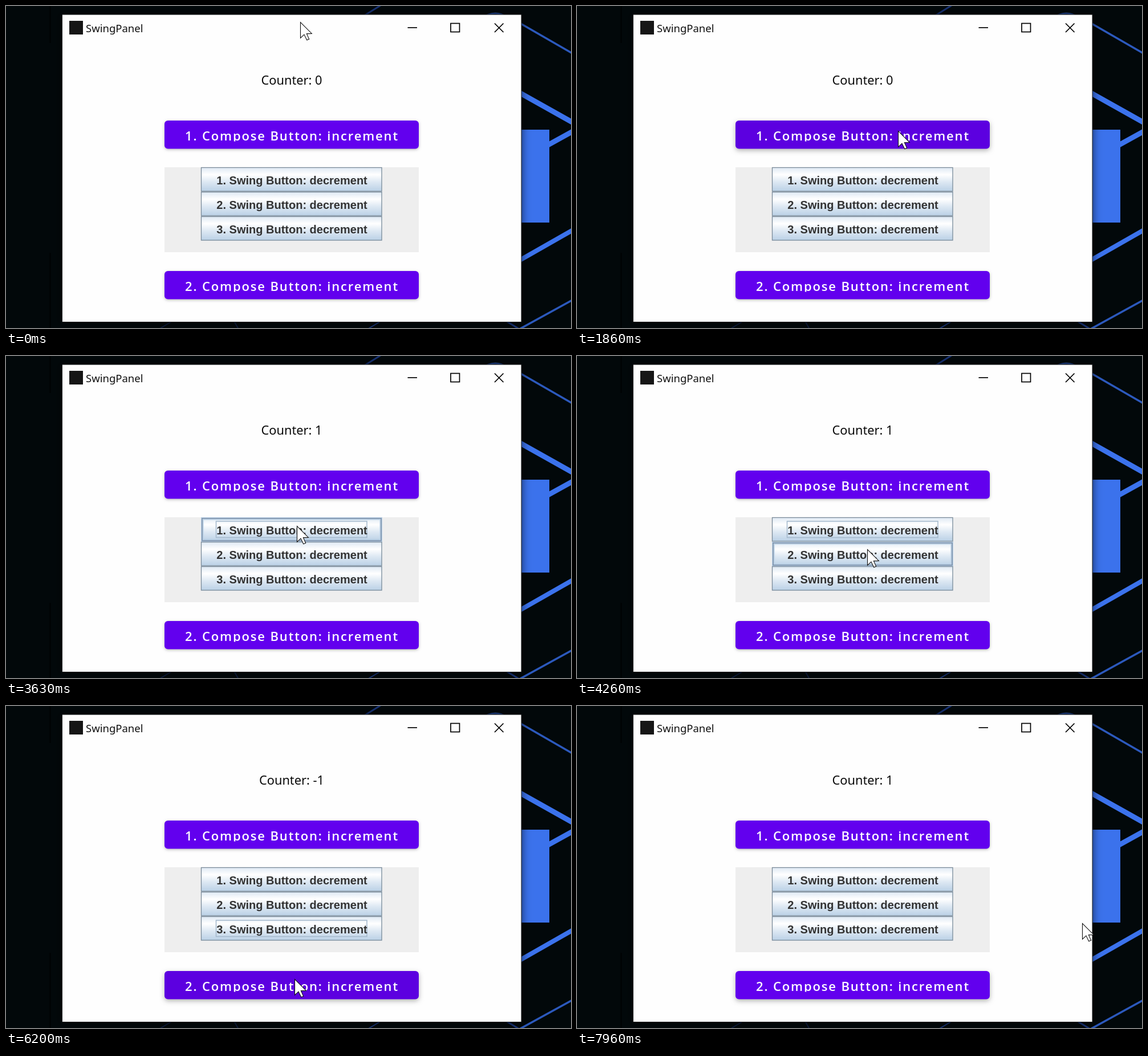
Write an HTML page with a canvas that moves like this. It is 991 by 565 pixels and loops after 8 s.

```html
<!DOCTYPE html>
<html lang="en">
<head>
<meta charset="utf-8">
<title>SwingPanel</title>
<style>
  html, body { margin: 0; width: 100%; height: 100%; overflow: hidden; background: #02080a; }
  canvas { display: block; }
</style>
</head>
<body>
<canvas id="stage" width="991" height="565"></canvas>
<script>
const ctx = document.getElementById('stage').getContext('2d');
const LOOP = 8000;
const PURPLE = '#6200ee';
const BLUE = '#3b72ec';

// Pointer moves: start and end time, target, optional control point.
const START = [516, 28];
const MOVES = [
  { t0: 1160, t1: 1860, to: [563, 219] },
  { t0: 2630, t1: 3300, to: [510, 298], via: [508, 253] },
  { t0: 3860, t1: 4240, to: [509, 339] },
  { t0: 4700, t1: 5000, to: [511, 375] },
  { t0: 5830, t1: 6200, to: [506, 479] },
  { t0: 7100, t1: 7960, to: [886, 381] }
];

const CLICKS = [
  { target: 'inc1', down: 2100, up: 2230, step: 1 },
  { target: 'inc1', down: 2400, up: 2530, step: 1 },
  { target: 0, down: 3500, up: 3630, step: -1 },
  { target: 1, down: 4360, up: 4530, step: -1 },
  { target: 2, down: 5300, up: 5430, step: -1 },
  { target: 'inc2', down: 6400, up: 6530, step: 1 },
  { target: 'inc2', down: 6730, up: 6860, step: 1 }
];

const COMPOSE = [
  { id: 'inc1', y: 201, label: '1. Compose Button: increment' },
  { id: 'inc2', y: 465, label: '2. Compose Button: increment' }
];
const BOX = { x: 278, w: 446, h: 49.5 };
const SWING = { x: 342, y: 283, w: 318, h: 43 };

const clamp = v => Math.max(0, Math.min(1, v));
const smooth = u => u * u * (3 - 2 * u);

function pointerAt(t) {
  let from = START;
  for (const { t0, t1, to, via } of MOVES) {
    if (t < t0) break;
    const e = smooth(clamp((t - t0) / (t1 - t0)));
    const mid = via || [(from[0] + to[0]) / 2, (from[1] + to[1]) / 2];
    const axis = i => (1 - e) ** 2 * from[i] + 2 * e * (1 - e) * mid[i] + e * e * to[i];
    if (t < t1) return [Math.round(axis(0)), Math.round(axis(1))];
    from = to;
  }
  return from;
}

const inside = ([px, py], x, y, w, h) => px >= x && px < x + w && py >= y && py < y + h;

function rect(x, y, w, h, fill) {
  ctx.fillStyle = fill;
  ctx.fillRect(x, y, w, h);
}

function frame(x, y, w, h, color, width) {
  ctx.strokeStyle = color;
  ctx.lineWidth = width;
  ctx.strokeRect(x, y, w, h);
}

function line(x1, y1, x2, y2, color, width) {
  ctx.strokeStyle = color;
  ctx.lineWidth = width;
  ctx.beginPath();
  ctx.moveTo(x1, y1);
  ctx.lineTo(x2, y2);
  ctx.stroke();
}

function text(str, x, y, font, color, align = 'left', spacing = 0) {
  ctx.font = font;
  ctx.fillStyle = color;
  ctx.textAlign = align;
  ctx.letterSpacing = spacing + 'px';
  ctx.fillText(str, x, y);
  ctx.letterSpacing = '0px';
}

function drawDesktop() {
  rect(0, 0, 991, 565, '#02080a');
  rect(76, 0, 3, 65, '#000304');
  rect(76, 433, 3, 132, '#000304');

  line(628, 17, 657, -1, '#173275', 3);
  line(896, 27, 995, 84, '#2c59bd', 3.5);
  line(896, 149.5, 995, 205, BLUE, 9);
  line(945, 247, 995, 219.5, BLUE, 9);
  line(896, 449, 995, 392.5, BLUE, 8);
  line(895, 570, 995, 515, '#2c59bd', 3.5);
  line(874, 551, 899, 566, '#173275', 3);
  line(268, 567, 290, 554, '#0c1a3a', 2);
  line(400, 553, 408, 567, '#0c1a3a', 2);
  line(634, 567, 656, 554, '#173275', 2);
  ctx.strokeStyle = '#23468f';
  ctx.lineWidth = 3;
  ctx.beginPath();
  ctx.arc(858, 48, 35, Math.PI * 1.2, Math.PI * 1.8);
  ctx.stroke();
  rect(790, 217, 163, 163, BLUE);
}

function drawWindow() {
  ctx.save();
  ctx.shadowColor = 'rgba(0,0,0,.6)';
  ctx.shadowBlur = 14;
  rect(98, 14.5, 806.5, 540.5, '#181c1e');
  ctx.restore();
  rect(99, 15.5, 804.5, 538.5, '#fefefe');
  rect(111, 26, 24, 24, '#161616');
  text('SwingPanel', 140, 46, '18.5px "Noto Sans", sans-serif', '#111');

  line(704.5, 38, 721, 38, '#000', 1.7);
  frame(780, 30.5, 15.5, 15, '#000', 1.7);
  line(857, 30.5, 872.5, 46, '#000', 1.7);
  line(872.5, 30.5, 857, 46, '#000', 1.7);
}

function drawRipple(click, t, y) {
  const age = t - click.down;
  const alpha = 0.12 * clamp(age / 75) * (1 - clamp((t - Math.max(click.up, click.down + 75)) / 150));
  if (age < 0 || alpha <= 0) return;
  const e = smooth(clamp(age / 225));
  const [px, py] = pointerAt(click.down);
  const cx = px + (BOX.x + BOX.w / 2 - px) * e;
  const cy = py + (y + BOX.h / 2 - py) * e;
  ctx.fillStyle = `rgba(0,0,0,${alpha})`;
  ctx.beginPath();
  ctx.arc(cx, cy, 134 + 108 * e, 0, Math.PI * 2);
  ctx.fill();
}

function drawCompose({ id, y, label }, t, pointer) {
  const { x, w, h } = BOX;
  const hover = inside(pointer, x, y, w, h);
  const focused = id === 'inc1' ? t >= 2100 && t < 3500 : t >= 6400;
  const raised = hover || focused;

  ctx.save();
  ctx.beginPath();
  ctx.roundRect(x, y, w, h, 6);
  ctx.shadowColor = raised ? 'rgba(0,0,0,.3)' : 'rgba(0,0,0,.27)';
  ctx.shadowBlur = raised ? 9 : 5;
  ctx.shadowOffsetY = raised ? 3 : 1.5;
  ctx.fillStyle = PURPLE;
  ctx.fill();
  ctx.shadowColor = 'transparent';
  ctx.clip();
  if (hover) rect(x, y, w, h, 'rgba(0,0,0,.06)');
  CLICKS.filter(c => c.target === id).forEach(c => drawRipple(c, t, y));

  // The label's line box cuts off descenders.
  ctx.beginPath();
  ctx.rect(x, y, w, 36.5);
  ctx.clip();
  text(label, 501.5, y + 35, '600 22px "Open Sans", sans-serif', '#fff', 'center', 1.85);
  ctx.restore();
}

function drawSwing(i, t, pointer, focus) {
  const { x, w, h } = SWING;
  const y = SWING.y + i * h;
  const pressed = CLICKS.some(c => c.target === i && t >= c.down && t < c.up);

  if (pressed) {
    rect(x, y, w, h, '#b8cfe5');
  } else {
    const g = ctx.createLinearGradient(0, y, 0, y + h);
    g.addColorStop(0, '#dde8f3');
    g.addColorStop(0.3, '#ffffff');
    g.addColorStop(0.6, '#dde8f3');
    g.addColorStop(1, '#b8cfe5');
    rect(x, y, w, h, g);
  }

  if (!pressed && inside(pointer, x, y, w, h)) {
    frame(x + 1, y + 1, w - 2, h - 2, '#b8cfe5', 2);
    frame(x + 2, y + 2, w - 4, h - 4, '#7a8fa8', 1.6);
    frame(x + 3.8, y + 3.8, w - 7.6, h - 7.6, '#b8cfe5', 1.6);
  } else {
    line(x + w - 0.5, y, x + w - 0.5, y + h, '#e8eff6', 1);
    line(x, y + h - 0.5, x + w, y + h - 0.5, '#e8eff6', 1);
    frame(x + 0.5, y + 0.5, w - 1.5, h - 1.5, '#7a8a99', 1.3);
  }
  if (focus === i) frame(x + 26.5, y + 7, 264.5, 28.5, '#a3b8cc', 1.5);
  text(`${i + 1}. Swing Button: decrement`, 369.3, y + 30.3,
    'bold 20px "Liberation Sans", Arial, sans-serif', '#333');
}

function drawPointer([x, y]) {
  const arrow = [[0, 0], [0, 16.8], [3.9, 13.1], [6.8, 19], [9.2, 18], [6.6, 12.2], [12, 12.1]];
  ctx.beginPath();
  arrow.forEach(([px, py]) => ctx.lineTo(x + 0.5 + px * 1.65, y + 0.5 + py * 1.65));
  ctx.closePath();
  ctx.fillStyle = '#fff';
  ctx.fill();
  ctx.strokeStyle = '#111';
  ctx.lineWidth = 1.1;
  ctx.stroke();
}

function draw() {
  const t = performance.now() % LOOP;
  const pointer = pointerAt(t);
  const count = CLICKS.reduce((sum, c) => sum + (t >= c.up ? c.step : 0), 0);
  const last = CLICKS.filter(c => t >= c.down).pop();
  const focus = last ? last.target : null;

  drawDesktop();
  drawWindow();
  text(`Counter: ${count}`, 501, 138, '21.8px "Noto Sans", sans-serif', '#0a0a0a', 'center');
  drawCompose(COMPOSE[0], t, pointer);
  rect(278, 283, 446, 149, '#eeeeee');
  for (let i = 0; i < 3; i++) drawSwing(i, t, pointer, focus);
  drawCompose(COMPOSE[1], t, pointer);
  drawPointer(pointer);
  requestAnimationFrame(draw);
}
draw();
</script>
</body>
</html>
```
